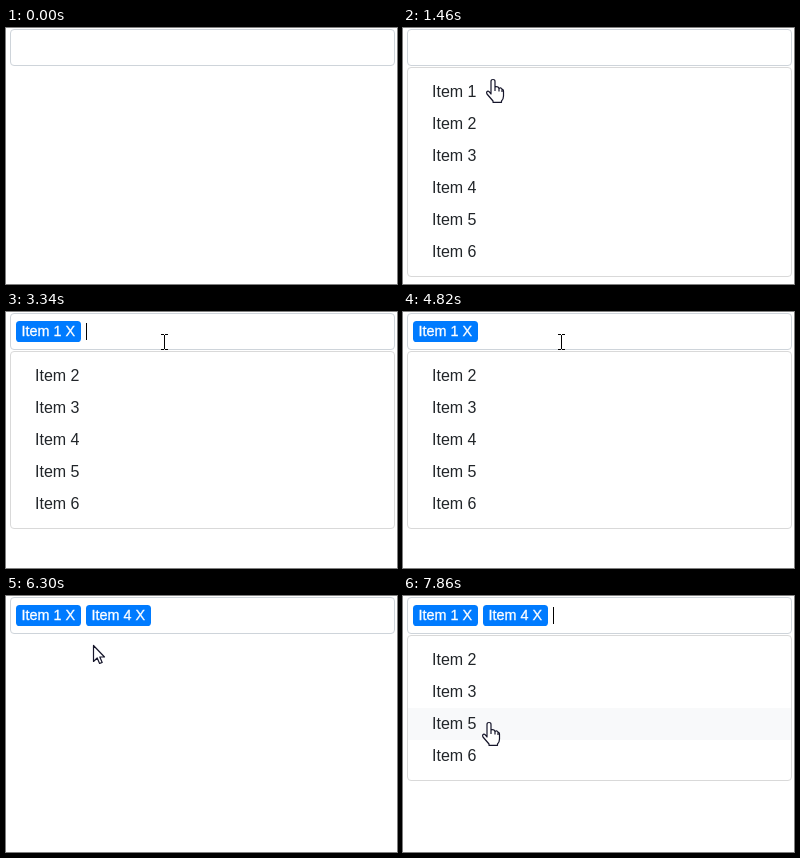
These frames come from a looping animation (391 by 256 pixels, 8 s). An HTML page:

```html
<!DOCTYPE html>
<html lang="en">
<head>
<meta charset="utf-8">
<title>Multi select</title>
<style>
  html, body { margin: 0; width: 100%; height: 100%; overflow: hidden; background: #fff; }
  svg { display: block; font: 16px Arial, "Liberation Sans", sans-serif; fill: #212529; }
  .box { fill: #fff; stroke: #ced4da; }
  .list { fill: #fff; stroke: #d9d9d9; }
  .hover { fill: #f8f9fa; }
  .chip { fill: #007bff; }
  .label { font-size: 14.4px; fill: #fff; stroke: #fff; stroke-width: .3; }
  .caret { fill: #000; }
  .click { fill: #fdfd80; }
  .arrow, .hand { fill: #fff; stroke: #15152a; stroke-width: 1.2; stroke-linejoin: round; }
  .beam { fill: none; stroke: #000; }
</style>
</head>
<body>
<svg id="stage" width="391" height="256" viewBox="0 0 391 256"></svg>
<script>
const LOOP = 8000, STEP = 78, START = 132; // the screen refreshes every STEP ms
const ROW = 32, LIST_TOP = 48, CHIP = 70;
const stage = document.getElementById('stage');

// Each session opens the list, may type a query, and picks an item on closing.
const sessions = [
  { open: 9, close: 22, pick: 1, press: 2 },
  { open: 40, close: 76, pick: 4, press: 1, type: 62 },
  { open: 86, close: Infinity, press: 2 }
];

// The pointer glides to each stop in turn.
const stops = [
  { at: 0, steps: 7, x: 145, y: 24 },
  { at: 13, steps: 5, x: 89, y: 51 },
  { at: 18, steps: 3, x: 83, y: 59 },
  { at: 24, steps: 5, x: 158, y: 30 },
  { at: 68, steps: 4, x: 67, y: 56 },
  { at: 78, steps: 7, x: 167, y: 20 },
  { at: 90, steps: 6, x: 85, y: 126 }
];

const shapes = {
  arrow: 'M.5.5V16.5l3.7-3.5 2.4 5.5 2.6-1.1-2.4-5.4h4.7z',
  hand: 'M-1 2.5Q-1 .5 1 .5T3 2.5V8Q6 7 7 9.5Q9.5 8 10 10.5Q11.5 10 11.5 12.5V17Q11.5 20 9.5 22V23.3H1V22L-5 15Q-6.2 12.8-4 12.2Q-3 12-1 15ZM3 8V12M7 9V12.5M10 10V13',
  beam: 'M-3-7.5h3m1 0h3M.5-7V7M-3 7.5h3m1 0h3'
};

const ease = p => p * p * (3 - 2 * p);
const within = (k, from, length) => k >= from && k < from + length;

function position(k) {
  let x = 237, y = 210;
  for (const stop of stops) {
    const p = ease(Math.max(0, Math.min(1, (k - stop.at + 1) / stop.steps)));
    x += (stop.x - x) * p;
    y += (stop.y - y) * p;
  }
  return [Math.round(x), Math.round(y)];
}

const rect = (cls, x, y, w, h, r = 0) =>
  `<rect class="${cls}" x="${x}" y="${y}" width="${w}" height="${h}" rx="${r}"/>`;
const text = (x, y, s, cls = '') => `<text class="${cls}" x="${x}" y="${y}">${s}</text>`;
const rowAt = y => Math.floor((y - LIST_TOP) / ROW);

function chip(n, i) {
  const x = 10 + CHIP * i;
  return rect('chip', x, 9, 65, 21, 3.6) + text(x + 5.5, 24, `Item ${n} X`, 'label');
}

function dropdown(items, k) {
  const row = rowAt(position(k - 2)[1]); // highlight trails the pointer
  let out = rect('list', 4.5, 39.5, 384, 17 + ROW * items.length, 3.5);
  if (row in items) out += rect('hover', 5, LIST_TOP + ROW * row, 383, ROW);
  return out + items.map((n, i) => text(29, 69 + ROW * i, `Item ${n}`)).join('');
}

function caret(k, x, since) {
  const on = Math.floor((k - since + .8) / 6.8) % 2 === 0;
  return on ? rect('caret', x, 11, 1, 17) : '';
}

function cursor(k, items) {
  const [x, y] = position(k);
  const kind = y < 38 ? 'beam' : rowAt(y) in items ? 'hand' : 'arrow';
  const pressed = sessions.some(s =>
    within(k, s.open, s.press) || within(k, s.close - s.press, s.press));
  const ring = pressed ? `<circle class="click" cx="${x - 2}" cy="${y - 1}" r="12"/>` : '';
  return [ring, `<path class="${kind}" transform="translate(${x} ${y})" d="${shapes[kind]}"/>`];
}

function draw(k) {
  const picked = sessions.filter(s => k >= s.close).map(s => s.pick);
  const session = sessions.find(s => k >= s.open && k < s.close);
  let out = rect('box', 4.5, 1.5, 384, 36, 3.5), items = [], field = '';
  if (session) {
    const { open, pick, type } = session;
    const typed = k >= type, filtered = k > type;
    const x = 10 + CHIP * picked.length;
    items = [1, 2, 3, 4, 5, 6].filter(n => filtered ? n === pick : !picked.includes(n));
    out += dropdown(items, k);
    if (typed) field += text(x, 24, pick);
    field += caret(k, typed ? x + 9 : x, typed ? type : open);
  }
  const [ring, pointer] = k < 0 ? ['', ''] : cursor(k, items);
  stage.innerHTML = out + ring + picked.map(chip).join('') + field + pointer;
}

let shown = null;
function tick() {
  const k = Math.floor((performance.now() % LOOP - START) / STEP);
  if (k !== shown) draw(shown = k);
  requestAnimationFrame(tick);
}
tick();
</script>
</body>
</html>
```
